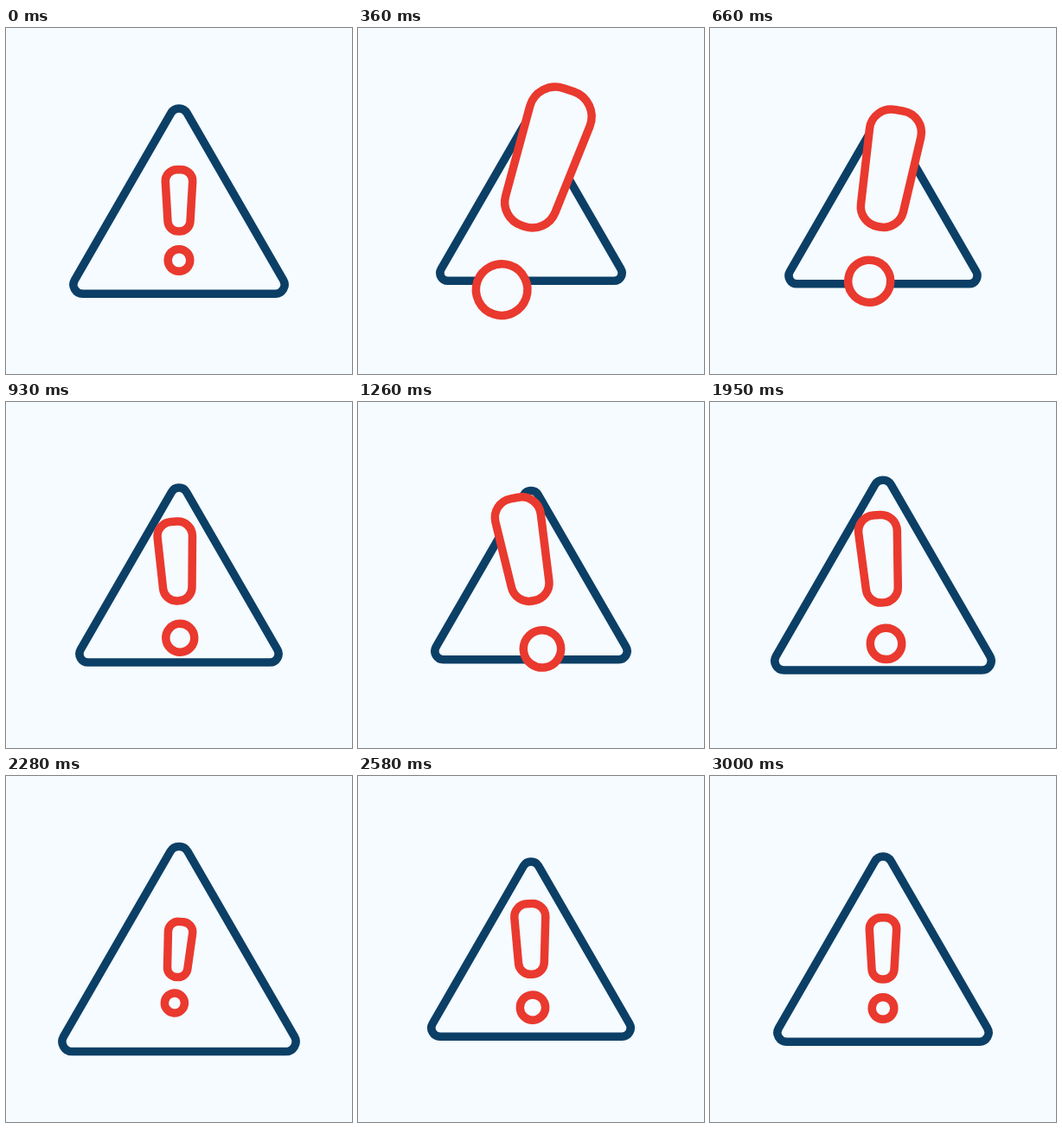
Recreate the animation shown at these times as an HTML page without scripts. Size 400 by 400 pixels, loop 4030 ms.

```html
<!DOCTYPE html>
<html lang="en">
<head>
<meta charset="utf-8">
<title>Warning sign</title>
<style>
  @property --size { syntax: "<number>"; inherits: true; initial-value: 1; }
  @property --tilt { syntax: "<angle>"; inherits: true; initial-value: 0deg; }
  @property --x { syntax: "<length>"; inherits: true; initial-value: 0px; }
  @property --y { syntax: "<length>"; inherits: true; initial-value: 0px; }

  :root { --paper: #f5fbff; --navy: #0c3f66; --red: #ea392e; }

  html, body {
    margin: 0;
    width: 100%;
    height: 100%;
    overflow: hidden;
    background: var(--paper);
  }

  svg { display: block; width: 100%; height: 100%; }

  /* Lines keep their weight while the shapes grow and shrink. */
  .part {
    fill: var(--paper);
    stroke-width: calc(9.5px / var(--size));
    transform: translate(var(--x), var(--y)) rotate(var(--tilt)) scale(var(--size));
    animation: 4030ms cubic-bezier(.35, 0, .65, 1) infinite;
  }

  .sign {
    stroke: var(--navy);
    transform-origin: 200px 200px;
    animation-name: pulse;
  }

  .mark {
    stroke: var(--red);
    transform-origin: 200px 222.7px;
    animation-name: swing;
  }

  /* Beats at 0.4, 1, 1.6, 2.2, 2.6 and 3 s, then a rest. */
  @keyframes pulse {
    0%, 74.442%, 100% { --size: 1; }
    9.926%, 39.702% { --size: .858; }
    24.814% { --size: .946; }
    54.591% { --size: 1.125; }
    64.516% { --size: .943; }
  }

  @keyframes swing {
    0%, 74.442%, 100% { --size: 1; --tilt: 0deg; --x: 0px; --y: 0px; }
    9.926%  { --size: 2.36; --tilt: 19deg; --x: 0px; --y: -21.7px; }
    24.814% { --size: 1.248; --tilt: -3.7deg; --x: -1.8px; --y: -8.3px; }
    39.702% { --size: 2.36; --tilt: -20.5deg; --x: 0px; --y: -21.5px; }
    54.591% { --size: .872; --tilt: 5.4deg; --x: -2px; --y: -.6px; }
    64.516% { --size: 1.147; --tilt: -1.8deg; --x: .4px; --y: -7.6px; }
  }
</style>
</head>
<body>
<svg viewBox="0 0 400 400">
  <path class="part sign" d="M79.4 291.4 L190.9 98.2 A10.5 10.5 0 0 1 209.1 98.2 L320.6 291.4 A10.5 10.5 0 0 1 311.5 307.2 H88.5 A10.5 10.5 0 0 1 79.4 291.4Z"/>
  <g class="part mark">
    <path d="M197.4 163.8 H202.6 A13.1 13.1 0 0 1 215.7 177.6 L213 223.6 A12.2 12.2 0 0 1 200.8 235.1 H199.2 A12.2 12.2 0 0 1 187 223.6 L184.3 177.6 A13.1 13.1 0 0 1 197.4 163.8Z"/>
    <circle cx="200" cy="268.5" r="12.8"/>
  </g>
</svg>
</body>
</html>
```
